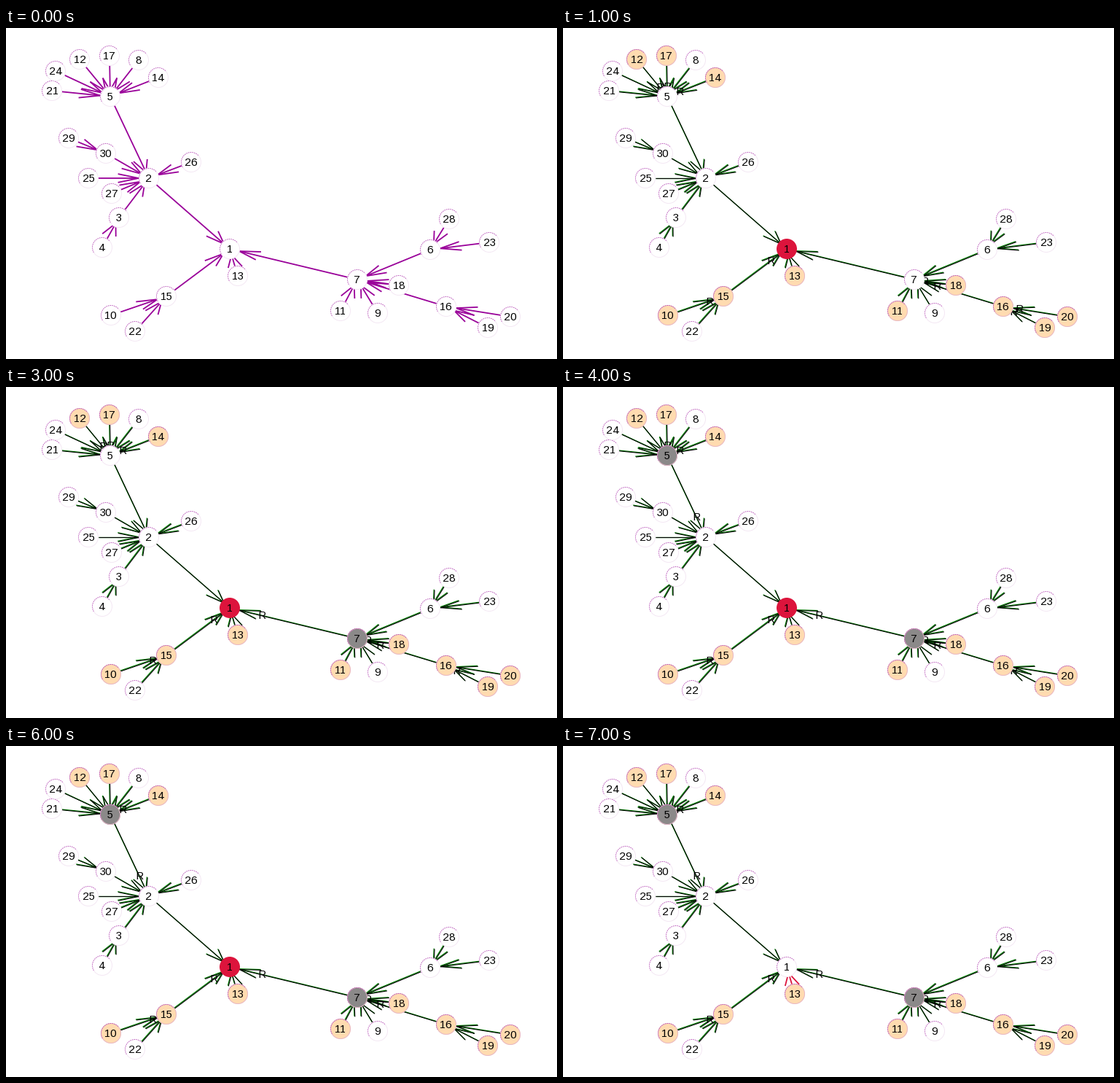
Recreate the animation shown at these times as a matplotlib script. Size 756 by 454 pixels, loop 8 s.

```python
import numpy as np
import matplotlib.pyplot as plt
from matplotlib.animation import FuncAnimation
from matplotlib.collections import LineCollection
from matplotlib.patches import Arc, Circle

W, H, DPI = 756, 454, 100
PX = 72 / DPI                      # points per pixel
STRETCH = np.array([1, W / H])     # the layout lives in a square fitted to the stage
RADIUS, HEAD, SPREAD = 14, 30, 19

PURPLE, GREEN, CRIMSON = "#990099", "#008000", "#dc143c"
PEACH, GRAY = "#ffdbb0", "#8b8989"

plt.rcParams["text.hinting_factor"] = 1


def polar(r, degrees):
    a = np.radians(degrees)
    return r * np.array([np.cos(a), np.sin(a)]) / STRETCH


pos, parent = {}, {}


def hub(node, up, x, y):
    pos[node], parent[node] = np.array([x, y], float), up


def fan(up, nodes, angles, radii):
    """Spread leaves around a hub, evenly from the first angle to the last."""
    for node, a, r in zip(nodes, np.linspace(*angles, len(nodes)),
                          np.linspace(*radii, len(nodes))):
        pos[node], parent[node] = np.round(pos[up] + polar(r, a)), up


hub(1, None, 307, 303)
hub(2, 1, 196, 206)
hub(7, 1, 482, 345)
hub(15, 1, 220, 368)
hub(5, 2, 143, 94)
hub(3, 2, 155, 260)
hub(30, 2, 137, 172)
hub(6, 7, 582, 304)
hub(16, 7, 604, 382)

fan(5, [24, 12, 17, 8], (218, 295), (95, 92))
fan(5, [14, 21], (327, 189), (79, 81))
fan(2, [25, 27], (180, 145), (83, 62))
fan(2, [26], (328, 328), (68, 68))
fan(30, [29], (214, 214), (62, 62))
fan(3, [4], (109, 109), (72, 72))
fan(1, [13], (80, 80), (63, 63))
fan(15, [10, 22], (150, 118.5), (87.5, 91))
fan(7, [18], (13, 13), (58.5, 58.5))
fan(7, [9, 11], (70, 108), (81, 75))
fan(16, [20, 19], (15, 40), (91.5, 74))
fan(6, [28, 23], (-70, -11.5), (75, 83))

WAITING = set(range(10, 21))
BUSY_FROM = {7: 2, 5: 4}           # node: second in which it turns gray
RELEASE = 7                        # second in which node 1 is free again
# second: nodes whose request appears on, or leaves, the edge to the parent
TOGGLES = {1: WAITING - {11, 13}, 2: {7, 16}, 3: {16, 20},
           4: {5, 12}, 5: {17}, 6: {19}}


def requests(second):
    sent = set()
    for start, nodes in TOGGLES.items():
        if start <= second:
            sent = sent ^ nodes
    return sent


def fill(node, second):
    if second == 0:
        return "white"
    if node == 1 and second < RELEASE:
        return CRIMSON
    if second >= BUSY_FROM.get(node, np.inf):
        return GRAY
    return PEACH if node in WAITING else "white"


def arrow(child):
    """Shaft and two barbs pointing from a node to its parent."""
    a, b = pos[child], pos[parent[child]]
    dx, dy = (a - b) * STRETCH
    back = np.degrees(np.arctan2(dy, dx))
    gap = polar(RADIUS, back)
    tip = b + gap
    barbs = [(tip, tip + polar(HEAD, back + s)) for s in (-SPREAD, SPREAD)]
    return np.array([(a - gap, tip)] + barbs)


def strokes(lines, color, width, shift=0.0):
    ax.add_collection(LineCollection(lines + shift, colors=color,
                                     linewidths=width * PX, zorder=1))


def word(x, y, text, z):
    ax.text(x, y + 5, text, family="Liberation Sans", size=15 * PX,
            ha="center", va="baseline", zorder=z)


def draw_edge(child, second):
    lines = arrow(child)
    if second == 0:
        strokes(lines, PURPLE, 1.8)
    elif second >= RELEASE and child == 13:
        strokes(lines, CRIMSON, 1.8)
    else:
        # a diagonal offset leaves rising lines greener than falling ones
        strokes(lines, GREEN, 1.3, -0.4)
        strokes(lines, "black", 1.1, 0.4)


def draw_node(node, color):
    x, y = pos[node]
    ax.add_patch(Circle((x, y), RADIUS, fc=color, ec="none", zorder=3))
    if color != CRIMSON:
        size = 2 * RADIUS - 1
        pale = "#f3e6f3" if color == "white" else "#e6b4c8"
        for span, tone, dash in (((0, 360), pale, "-"),
                                 ((150, 320), "#b84cb8", (0, (1.5, 1.5)))):
            ax.add_patch(Arc((x, y), size, size, theta1=span[0], theta2=span[1],
                             ec=tone, ls=dash, lw=0.9 * PX, zorder=4))
    word(x, y, str(node), 5)


def draw(second):
    ax.clear()
    ax.set(xlim=(0, W), ylim=(H, 0))
    ax.axis("off")
    for child, up in parent.items():
        if up:
            draw_edge(child, second)
    for child in sorted(requests(second)):
        x, y = pos[child] / 4 + pos[parent[child]] * 3 / 4
        word(x, y, "R", 2)
    for node in sorted(pos):
        draw_node(node, fill(node, second))
    return []


fig = plt.figure(figsize=(W / DPI, H / DPI), dpi=DPI, facecolor="white")
ax = fig.add_axes([0, 0, 1, 1])
anim = FuncAnimation(fig, draw, frames=8, interval=1000, repeat=True,
                     repeat_delay=0, init_func=lambda: [])
plt.show()
```
